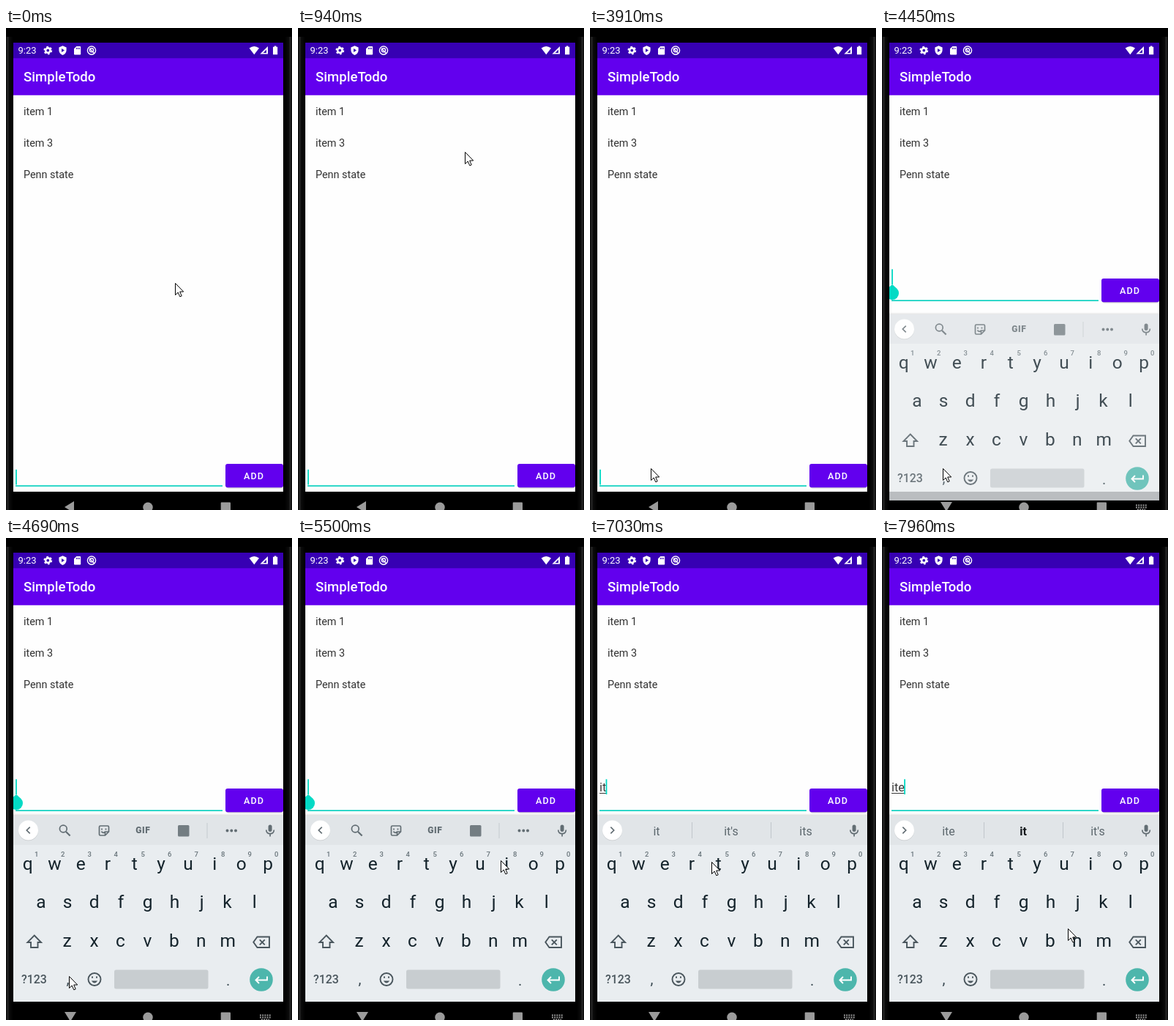
An HTML page for the animation above (8 s loop, 391 px wide and 658 px high).

```html
<!DOCTYPE html>
<html lang="en">
<head>
<meta charset="utf-8">
<title>Todo app</title>
<style>
  html, body { margin: 0; width: 100%; height: 100%; overflow: hidden; background: #000; }
  svg { display: block; width: 391px; height: 658px; font-family: Roboto, sans-serif; }
  .mid { text-anchor: middle; }
  .line { fill: none; stroke: #626d73; stroke-width: 1.7; }
  .dark { stroke: #4a565d; stroke-width: 1.9; }
  .keys { font-size: 24.5px; fill: #14232b; }
  .hint { font-size: 9.5px; fill: #68747a; font-weight: 500; }
  .word { font-size: 16px; fill: #5c676d; }
  .bold { font-weight: 700; fill: #14191c; }
</style>
</head>
<body>
<svg viewBox="0 0 391 658">
  <defs>
    <linearGradient id="edge">
      <stop offset="0" stop-color="#050505"/>
      <stop offset=".25" stop-color="#262626"/>
      <stop offset=".45" stop-color="#0b0b0b"/>
      <stop offset="1" stop-color="#000"/>
    </linearGradient>
    <linearGradient id="shade" x2="0" y2="1">
      <stop offset="0" stop-color="#000" stop-opacity="0"/>
      <stop offset="1" stop-color="#000" stop-opacity=".13"/>
    </linearGradient>
    <clipPath id="screen"><path d="M10 20H379V658H10Z"/></clipPath>
  </defs>

  <path d="M0 0H391V658H0Z"/>
  <path id="side" d="M0 12H10V658H0Z" fill="url(#edge)"/>
  <use href="#side" transform="matrix(-1 0 0 1 391 0)"/>
  <path d="M10 91H379V633H10Z" fill="#fefefe"/>
  <path d="M10 20H379V42H10Z" fill="#3700b3"/>
  <path d="M10 41.3H379V91.7H10Z" fill="#6200ee"/>

  <!-- status bar -->
  <g fill="#fff">
    <text x="16.5" y="35.3" font-size="13">9:23</text>
    <circle cx="57.3" cy="30.6" r="3.2" fill="none" stroke="#fff" stroke-width="2.6"/>
    <circle cx="57.3" cy="30.6" r="5" fill="none" stroke="#fff" stroke-width="1.8" stroke-dasharray="2.6 2.636"/>
    <path d="M77.5 24.3L82.6 26.4V30.3C82.6 33.6 80.4 36 77.5 37C74.6 36 72.4 33.6 72.4 30.3V26.4Z"/>
    <path d="M76 28V33L80 30.5Z" fill="#3700b3"/>
    <path d="M96.3 25H101.2Q102.2 25 102.2 26V35.4Q102.2 36.4 101.2 36.4H94Q93 36.4 93 35.4V28.3Z"/>
    <path d="M96.4 26.8V29M98.4 26.8V29M100.4 26.8V29" stroke="#3700b3"/>
    <g fill="none" stroke="#fff" stroke-width="1.4">
      <circle cx="117" cy="30.6" r="5.6"/>
      <circle cx="117" cy="30.3" r="2.6"/>
      <path d="M114 28L121 35"/>
    </g>
    <path d="M332.6 27.6Q339.3 22.2 346 27.6L339.3 36.2Z"/>
    <path d="M358 25V35.6H347.4Z"/>
    <path d="M356 29.5V34H351.6Z" fill="#3700b3"/>
    <path d="M366.8 24.6H369.4V25.8H371.2V36.2H365V25.8H366.8Z"/>
    <text x="24" y="73.3" font-size="18.6" font-weight="500">SimpleTodo</text>
  </g>

  <g font-size="14.4" fill="#323232">
    <text x="24" y="118.6">item 1</text>
    <text x="24" y="161.6">item 3</text>
    <text x="24" y="204.6">Penn state</text>
  </g>

  <!-- input row -->
  <g id="row">
    <rect x="300.5" y="343" width="78.5" height="32.5" rx="4" opacity=".18"/>
    <rect x="300" y="342" width="79" height="32.3" rx="3" fill="#6200ee"/>
    <text x="325" y="362.7" font-size="12.6" font-weight="500" letter-spacing="1.12" fill="#fff">ADD</text>
    <path d="M13 372.2H296" stroke="#14d2c2" stroke-width="1.8"/>
  </g>
  <text id="typed" x="13" y="346.3" font-size="16.2" fill="#383838"></text>
  <rect id="under" x="13" y="348" height="1" fill="#383838"/>
  <g clip-path="url(#screen)" fill="#03dac5">
    <g id="mark">
      <rect id="caret" x="-.9" y="329.3" width="1.8" height="20.7"/>
      <path id="drop" d="M0 350L6.4 355.7A9 9 0 1 1 -6.4 355.7Z"/>
    </g>
  </g>

  <!-- keyboard -->
  <g id="board">
    <path d="M10 376H379V379H10Z" fill="url(#shade)"/>
    <path d="M10 379H379V419H10Z" fill="#e1e5e8"/>
    <path d="M10 419H379V633H10Z" fill="#e9edf0"/>
    <circle cx="30.5" cy="399.8" r="13.5" opacity=".12"/>
    <circle cx="30.5" cy="399" r="13.5" fill="#fff"/>
    <path id="chev" class="line" d="M2.2 -4.3L-2.2 0L2.2 4.3"/>
    <g id="tools">
      <g class="line">
        <circle cx="78.3" cy="397" r="4.9"/>
        <path d="M82 401L87.6 406.5" stroke-width="2.2"/>
        <path d="M129 393H139Q140.5 393 140.5 394.5V401L135.5 406H129Q127.5 406 127.5 404.5V394.5Q127.5 393 129 393ZM140 401H135.5V406M130.5 400.5Q132.5 403.5 135 401.5M131 396.5V398.5M136.5 396.5V398.5"/>
      </g>
      <text class="mid" x="187.3" y="403.4" font-size="12" font-weight="900" letter-spacing=".6" fill="#626d73">GIF</text>
      <rect x="235" y="392" width="15.5" height="15.5" rx="1.5" fill="#737d82"/>
      <path d="M275 389V410" stroke="#c5cbcf"/>
      <path d="M302.5 399.5h.01M308.3 399.5h.01M314 399.5h.01" stroke="#626d73" stroke-width="4" stroke-linecap="round"/>
    </g>
    <g id="words">
      <path d="M139.5 388V410M247.5 388V410" stroke="#c0c6ca"/>
      <text class="word mid" x="91" y="405.5"></text>
      <text class="word mid" x="193" y="405.5"></text>
      <text class="word mid" x="295" y="405.5"></text>
    </g>
    <rect x="358.6" y="391.5" width="5" height="9.5" rx="2.5" fill="#626d73"/>
    <path class="line" d="M355.8 398.5Q356 403.7 361.1 403.7Q366.2 403.7 366.4 398.5M361.1 403.5V407.5"/>
    <g id="letters"></g>
    <g class="line dark">
      <path d="M38.7 542.5L48 552H43.5V559H34V552H29.4Z"/>
      <path d="M343.5 544.5H360V559H343.5L338.3 551.7ZM346.8 548.3L353.8 555.3M353.8 548.3L346.8 555.3"/>
      <circle cx="121" cy="602.5" r="8.5"/>
      <path d="M116.8 604.5Q121 610.5 125.2 604.5Z" fill="#4a565d" stroke="none"/>
      <path d="M118 598.5V600.8M124 598.5V600.8"/>
    </g>
    <text x="21" y="608.3" font-size="15.9" font-weight="500" fill="#4a565d">?123</text>
    <g class="mid" font-size="20" fill="#37474f">
      <text x="84.5" y="609">,</text>
      <text x="303.7" y="611">.</text>
    </g>
    <rect x="148" y="589.5" width="128.5" height="26" rx="2.5" fill="#c8cdd0"/>
    <circle cx="349" cy="603" r="15.8" fill="#4db6ac"/>
    <path d="M357 598.5V603.5H342M346 599L341.5 603.5L346 608" fill="none" stroke="#fff" stroke-width="1.9"/>
  </g>

  <!-- navigation bar -->
  <g fill="#9b9b9b">
    <path id="back" d="M80 654L93 646V662Z"/>
    <path id="down" d="M80 647H96L88 660Z"/>
    <circle cx="194" cy="654.3" r="6.7"/>
    <rect x="293.7" y="647.5" width="13.3" height="13" rx="1"/>
    <path id="mini" d="M347 651.5H362M347 654.5H362M349 657.5H360" stroke="#9b9b9b" stroke-width="1.8" stroke-dasharray="1.9 1.3"/>
  </g>

  <path id="pointer" d="M.5 .5V16.5L4.2 13L6.8 18.8L9.2 17.8L6.7 12H11.7Z" fill="#fff" stroke="#000" stroke-linejoin="round"/>
</svg>
<script>
const LOOP = 8000, STEP = 132.5, BLINK = 530;
const TAP = 3840, GRIP = 4030, OPEN = 4320, SLIDE = 125;
const $ = id => document.getElementById(id);

// Pointer glides from rest to rest.
const home = { x: 231, y: 348 };
const glides = [
  { from: 140, to: 920, x: 228, y: 169 },
  { from: 1440, to: 1980, x: 334, y: 82 },
  { from: 2900, to: 3600, x: 110, y: 640 },
  { from: 3600, to: TAP, x: 83, y: 601 },
  { from: 4570, to: 5430, x: 277, y: 440 },
  { from: 6200, to: 7010, x: 166, y: 442 },
  { from: 7150, to: 7500, x: 100, y: 443 },
  { from: 7550, to: 7940, x: 254, y: 533 }];

const typing = [
  { t: 0, text: '', words: [] },
  { t: 5790, text: 'i', words: ['i', 'I', "I'm"], bold: true },
  { t: 6890, text: 'it', words: ['it', "it's", 'its'] },
  { t: 7560, text: 'ite', words: ['ite', 'it', "it's"], bold: true }];

// Every touch or key press restarts the caret's blinking.
const wakes = [-120, TAP, OPEN, ...typing.slice(1).map(s => s.t)];

const last = (list, ok) => list.filter(ok).pop();
const ease = k => k * k * (3 - 2 * k);
const show = (id, on) => { $(id).style.display = on ? '' : 'none'; };
const move = (id, x, y) => $(id).setAttribute('transform', `translate(${x} ${y})`);
const words = [...document.querySelectorAll('.word')];
const pen = document.createElement('canvas').getContext('2d');

// Key caps are centred on their ink, not on their advance width.
function addRow(chars, x, y, cls) {
  [...chars].forEach((c, i) => {
    const el = document.createElementNS('http://www.w3.org/2000/svg', 'text');
    el.setAttribute('class', cls + ' mid');
    el.textContent = c;
    $('letters').append(el);
    pen.font = getComputedStyle(el).fontSize + ' Roboto, sans-serif';
    pen.textAlign = 'center';
    const ink = pen.measureText(c);
    const shift = (ink.actualBoundingBoxLeft - ink.actualBoundingBoxRight) / 2;
    el.setAttribute('x', x + 36.5 * i + shift);
    el.setAttribute('y', y);
  });
}
addRow('qwertyuiop', 29.7, 453, 'keys');
addRow('1234567890', 41, 435, 'hint');
addRow('asdfghjkl', 47.8, 505, 'keys');
addRow('zxcvbnm', 84, 558, 'keys');

function pointerAt(t) {
  let { x, y } = home;
  for (const g of glides) {
    const k = ease(Math.min(1, Math.max(0, (t - g.from) / (g.to - g.from))));
    x += (g.x - x) * k;
    y += (g.y - y) * k;
  }
  return [Math.round(x), Math.round(y)];
}

function draw(t) {
  const open = t >= OPEN;
  const state = last(typing, s => s.t <= t);
  const busy = state.text !== '';
  const awake = t - last(wakes, w => w <= t);

  move('pointer', ...pointerAt(Math.floor(t / STEP) * STEP));
  move('row', 0, open ? 0 : 253);

  $('typed').textContent = state.text;
  const width = busy ? $('typed').getComputedTextLength() : 0;
  $('under').setAttribute('width', width);
  move('mark', busy ? 13.2 + width : 14, open ? 0 : 273.5);
  show('caret', Math.floor(awake / BLINK) % 2 === 0);
  show('drop', t >= GRIP && !busy);

  const left = Math.max(0, 1 - Math.floor((t - OPEN) / SLIDE) / 2);
  show('board', open);
  move('board', 0, 48 * left * left);
  $('board').setAttribute('opacity', 1 - .4 * left);

  show('tools', !busy);
  show('words', busy);
  $('chev').setAttribute('transform', `translate(30.5 399) scale(${busy ? -1 : 1} 1)`);
  words.forEach((el, i) => {
    el.textContent = state.words[i] || '';
    el.classList.toggle('bold', i === 1 && !!state.bold);
  });

  show('back', !open);
  show('down', open);
  show('mini', open);
}

const start = performance.now();
function frame() {
  draw((performance.now() - start) % LOOP);
  requestAnimationFrame(frame);
}
draw(0);
requestAnimationFrame(frame);
</script>
</body>
</html>
```
